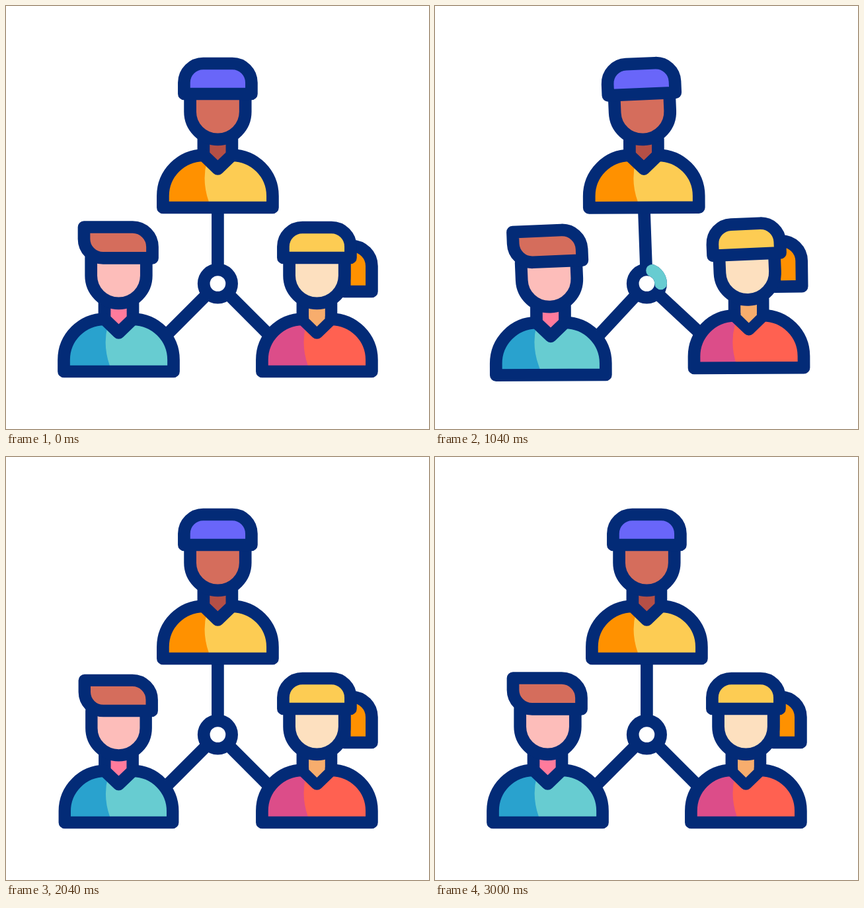
An HTML page with a canvas that plays this animation: 640 by 640 pixels, repeating every 3.52 s.

```html
<!DOCTYPE html>
<html lang="en">
<head>
<meta charset="utf-8">
<title>Team network</title>
<style>
html, body { margin: 0; width: 100%; height: 100%; overflow: hidden; background: #fff; }
canvas { display: block; width: 640px; height: 640px; }
</style>
</head>
<body>
<canvas id="stage" width="640" height="640"></canvas>
<script>
const ctx = document.getElementById('stage').getContext('2d');
const LOOP = 3520, STEP = 40, LAST = 3000;
const NAVY = '#032b77', TEAL = '#67ccd1', LINE = 18.7;
const HUB = { x: 320.4, y: 420, r: 21.2 };
const RAD = Math.PI / 180;

// Shapes relative to the middle of a figure's base line
const BODY = new Path2D('M-83 0V-17.5A61.7 61.7 0 0 1-21.5-79.2L0-58.5L21.5-79.2A61.7 61.7 0 0 1 83-17.5V0Z');
const SHADE = new Path2D('M-120-110H-15L-16.4-70Q-24.5-40-13.6-9L-9 4V14H-120Z');
const NECK = new Path2D('M-21.5-104V-79L0-58.5L21.5-79V-104');
const COLLAR = new Path2D('M-12.2-96H12.2V-80L0-68L-12.2-80Z');
const FACE = new Path2D('M-41.8-172V-145a41.8 41.8 0 0 0 83.6 0V-172');
const CAP = new Path2D('M-51-172V-189a29 29 0 0 1 29-29H22a29 29 0 0 1 29 29V-172Z');
const QUIFF = new Path2D('M-52.5-218.5H21a30 30 0 0 1 30 30V-171.6H-23.5a29 29 0 0 1-29-29Z');
// Relative to the point where the hair is tied
const TAIL = new Path2D('M-3.2-18H7.5a30.5 30.5 0 0 1 30.5 30.5V51H-3.2Z');
const NECK_Y = -100, TIE = { x: 45, y: -172 };

const figures = [
  { x: 320.4, y: 305, pop: 2040, hair: CAP, hairColor: '#6966f9', face: '#d56d5c',
    neck: '#b54f46', shirt: '#fdcc53', shade: '#ff9100' },
  { x: 170.5, y: 553, pop: 1620, hair: QUIFF, hairColor: '#d56d5c', face: '#fdbdba',
    neck: '#ff7b9c', shirt: '#67ccd1', shade: '#29a2ce' },
  { x: 470.4, y: 553, pop: 2312, hair: CAP, hairColor: '#fdcc53', face: '#fde0bf',
    neck: '#f7ad6d', shirt: '#ff6151', shade: '#dc4d89', tail: '#ff9100', open: true }
];

const spokes = [
  { angle: -90, start: 1243 },
  { angle: 135, start: 1050 },
  { angle: 45, start: 1440 }
];

const bursts = [
  { x: 167.5, y: 299, turn: 0, start: 1600, inward: true },
  { x: 216, y: 156, turn: -90, start: 1640 },
  { x: 418, y: 156, turn: 90, start: 1640 },
  { x: 475, y: 299, turn: 0, start: 2320 }
];

const SWING = [[0, 0], [240, -3.15], [680, 3.9], [1080, -2.2], [1680, 0]];
const NOD = [[0, 0], [260, -4.2], [700, 3.4], [1080, -2.6], [1680, 0]];
const POP = [[0, 1], [160, 1.036], [360, 0.983], [680, 1]];

const clamp = v => Math.min(1, Math.max(0, v));

// Sine-eased value between [time, value] keys
function ease(keys, t) {
  if (t <= keys[0][0]) return keys[0][1];
  for (let i = 1; i < keys.length; i++) {
    const [t0, a] = keys[i - 1], [t1, b] = keys[i];
    if (t <= t1) return a + (b - a) * (1 - Math.cos(Math.PI * (t - t0) / (t1 - t0))) / 2;
  }
  return keys[keys.length - 1][1];
}

function paint(path, fill) {
  ctx.fillStyle = fill;
  ctx.fill(path);
  ctx.strokeStyle = NAVY;
  ctx.stroke(path);
}

function segment(x0, y0, x1, y1, color) {
  ctx.strokeStyle = color;
  ctx.beginPath();
  ctx.moveTo(x0, y0);
  ctx.lineTo(x1, y1);
  ctx.stroke();
}

function drawSpoke(spoke, swing, t) {
  ctx.save();
  ctx.translate(HUB.x, HUB.y);
  ctx.rotate((spoke.angle + swing) * RAD);
  segment(0, 0, 110, 0, NAVY);
  const head = 20 + 0.3 * (t - spoke.start), tail = head - 60;
  if (head > 20 && tail < 110) {
    segment(Math.max(15, tail), 0, Math.min(110, head), 0, TEAL);
  }
  ctx.restore();
}

function drawHub(t) {
  ctx.beginPath();
  ctx.arc(HUB.x, HUB.y, HUB.r, 0, 2 * Math.PI);
  ctx.fillStyle = '#fff';
  ctx.fill();
  ctx.strokeStyle = NAVY;
  ctx.stroke();
  const head = 360 * clamp((t - 960) / 320), tail = 360 * clamp((t - 1020) / 320);
  if (head > tail) {
    ctx.beginPath();
    ctx.arc(HUB.x, HUB.y, HUB.r, (tail - 90) * RAD, (head - 90) * RAD);
    ctx.strokeStyle = TEAL;
    ctx.stroke();
  }
}

// The ponytail hangs from the head and tilts less than it
function drawTail(color, tilt) {
  ctx.save();
  ctx.translate(TIE.x, TIE.y);
  ctx.rotate(-0.7 * tilt);
  paint(TAIL, color);
  ctx.restore();
}

function drawFigure(f, swing, nod, t) {
  const a = swing * RAD, dx = f.x - HUB.x, dy = f.y - HUB.y;
  const x = HUB.x + dx * Math.cos(a) - dy * Math.sin(a);
  const y = HUB.y + dx * Math.sin(a) + dy * Math.cos(a);
  const scale = ease(POP, t - f.pop);

  ctx.save();
  ctx.translate(x, y);
  ctx.rotate(a * 0.12);
  ctx.scale(scale, scale);
  paint(NECK, f.neck);

  // The shirt's shade keeps its place while the body sways
  ctx.fillStyle = f.shirt;
  ctx.fill(BODY);
  ctx.save();
  ctx.clip(BODY);
  ctx.translate(f.x - x, f.y - y);
  ctx.fillStyle = f.shade;
  ctx.fill(SHADE);
  ctx.restore();
  ctx.strokeStyle = NAVY;
  ctx.stroke(BODY);
  if (f.open) {
    ctx.fillStyle = f.neck;
    ctx.fill(COLLAR);
  }

  ctx.translate(0, NECK_Y);
  ctx.rotate(nod * RAD - a * 0.12);
  ctx.translate(0, -NECK_Y);
  if (f.tail) drawTail(f.tail, nod * RAD);
  paint(FACE, f.face);
  paint(f.hair, f.hairColor);
  ctx.restore();
}

function drawBurst(b, t) {
  const age = t - b.start;
  if (age < 0 || age >= 280) return;
  let from = 40 * clamp((age - 120) / 160), to = 40 * clamp(age / 160) + 0.01;
  if (b.inward) { from = 40 - from; to = 40 - to; }
  ctx.save();
  ctx.translate(b.x, b.y);
  ctx.rotate(b.turn * RAD);
  for (const side of [-1, 1]) {
    const px = d => side * (8.3 + 0.48 * d), py = d => -0.877 * d;
    segment(px(from), py(from), px(to), py(to), TEAL);
  }
  ctx.restore();
}

function draw(t) {
  ctx.fillStyle = '#fff';
  ctx.fillRect(0, 0, 640, 640);
  ctx.lineWidth = LINE;
  ctx.lineCap = ctx.lineJoin = 'round';
  const swing = ease(SWING, t), nod = ease(NOD, t);
  for (const s of spokes) drawSpoke(s, swing, t);
  drawHub(t);
  for (const f of figures) drawFigure(f, swing, nod, t);
  ctx.lineWidth = 19.6;
  for (const b of bursts) drawBurst(b, t);
}

const begin = performance.now();
function tick() {
  const t = Math.max(0, performance.now() - begin) % LOOP;
  draw(Math.min(LAST, Math.floor(t / STEP) * STEP));
  requestAnimationFrame(tick);
}
tick();
</script>
</body>
</html>
```
